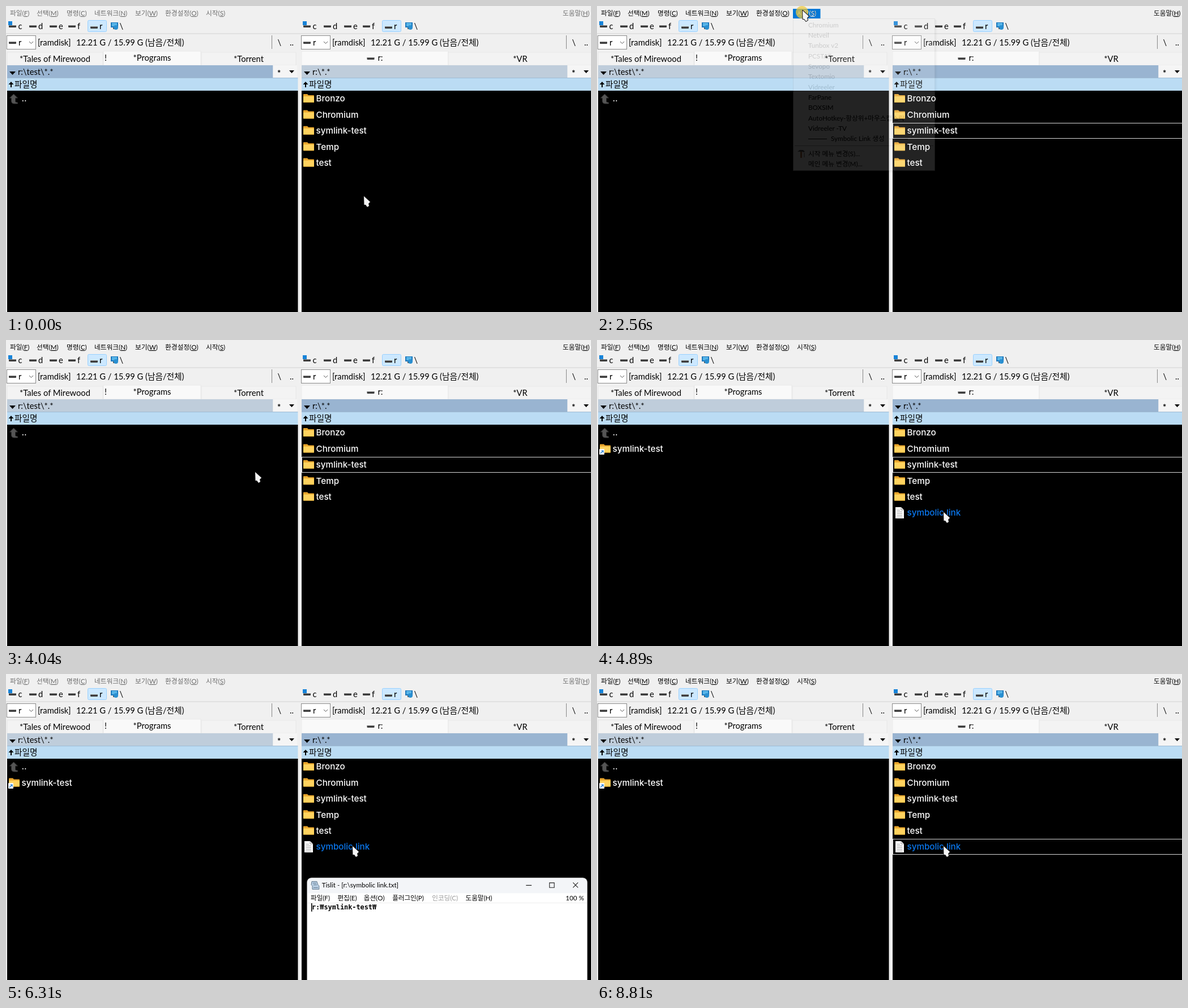
An HTML page that plays this animation: 1033x542 px, repeating every 8910 ms.

```html
<!DOCTYPE html>
<html lang="ko">
<head>
<meta charset="utf-8">
<title>Symbolic link demo</title>
<style>
html, body { margin: 0; width: 100%; height: 100%; overflow: hidden; background: #f0f0f0; }
svg { display: block; width: 1033px; height: 542px; }
text { font-family: Lato, "Noto Sans CJK KR", "Noto Sans CJK", sans-serif; font-size: 14.7px; white-space: pre; }
.small text, text.small { font-size: 11.7px; }
.files text { font-family: Inter, sans-serif; font-size: 15.2px; font-weight: 500; fill: #fff; }
text.mono { font-family: "DejaVu Sans Mono", monospace; font-size: 12px; font-weight: bold; }
.u { text-decoration: underline; }
</style>
</head>
<body>
<svg id="stage" viewBox="0 0 1033 542"></svg>
<script>
const LOOP = 8910;
const BLUE = '#0078d7';

const rect = (x, y, w, h, fill, more = '') =>
  `<rect x="${x}" y="${y}" width="${w}" height="${h}" fill="${fill}" ${more}/>`;
const path = (d, more = '') => `<path d="${d}" ${more}/>`;
const text = (x, y, s, more = '') => `<text x="${x}" y="${y}" ${more}>${s}</text>`;
const group = (content, more = '') => `<g ${more}>${content}</g>`;
const accel = s => s.replace(/\((\w)\)/, '(<tspan class="u">$1</tspan>)');
const centered = 'text-anchor="middle"';
const stroke = (color, width = 1) => `fill="none" stroke="${color}" stroke-width="${width}"`;

const driveIcon = (x, y) => rect(x, y, 13, 4, '#3c3c3c', 'rx="1"') + rect(x, y, 13, 1, '#8a8a8a');

const folder = (x, y) =>
  path(`M${x} ${y + 1}q0-1 1-1h6l2 2h9q1 0 1 1v10h-19z`, 'fill="#e9a52c"') +
  rect(x, y + 4, 19, 11, '#ffd35f', 'rx="1"') + rect(x, y + 14, 19, 1, '#efb63d');

const page = (x, y) =>
  path(`M${x} ${y}h10l5 5v15h-15z`, 'fill="#fafafa"') +
  path(`M${x + 10} ${y}v5h5`, stroke('#999')) +
  path(`M${x + 3} ${y + 5.5}h5m-5 3h9m-9 3h9m-9 3h9m-9 3h9`, stroke('#a8a8a8'));

function driveButtons() {
  const letters = [['c', 21.5], ['d', 57], ['e', 93], ['f', 126], ['r', 165]];
  return rect(144.5, 25.5, 33, 20, '#cce8ff', 'stroke="#99d1ff" rx="2"') +
    rect(4, 27, 7, 7, '#1683d8') +
    letters.map(([s, x]) => driveIcon(s === 'c' ? 5 : x - 16, s === 'r' ? 36 : 34) + text(x, 41, s)).join('') +
    rect(185, 29, 13, 9, '#1c78bd') + rect(187, 30, 9, 6, '#58b5e8') + rect(189, 38, 5, 3, '#555') +
    `<circle cx="194" cy="38" r="4" fill="#2a8fd0"/>` + text(200.5, 41, '\\');
}

function panel(x, tabs, dir, id) {
  const content = driveButtons() +
    rect(1.5, 52.5, 51, 24, '#fff', 'stroke="#8a8a8a"') + driveIcon(5, 63) + text(22, 70, 'r') +
    path('M41 63l3.5 3.5 3.5-3.5', stroke('#555')) +
    text(56, 70, '[ramdisk]') + text(124, 70, '12.21 G / 15.99 G (남음/전체)') +
    rect(469, 52, 1, 24, '#888') + text(479.5, 70, '\\') + text(501, 70, '..') +
    tabs +
    rect(2, 105, 469.5, 23, '#bfcddb', `id="${id}"`) + rect(471.5, 105, 42.5, 23, '#f5f5f5') +
    path('M6 116h11l-5.5 6zM500 114h9l-4.5 5z') + text(21, 122, dir) +
    text(482, 124, '*', centered + ' font-weight="bold"') +
    rect(2, 128, 514, 22, '#bbdcf4') + rect(2, 127, 514, 1, '#9fbbd3') +
    path('M9 134l-4.5 5h3.5v5h2v-5h3.5z') + text(15, 144, '파일명') +
    rect(2, 150, 514, 392, '#000');
  return group(content, `transform="translate(${x} 0)"`);
}

function tab(x, w, label, active, icon = '') {
  const top = active ? 80 : 82;
  return rect(x, top, w, 105 - top, active ? '#f9f9f9' : '#f3f3f3', 'stroke="#e3e3e3" stroke-width=".7"') +
    text(x + w / 2, active ? 97 : 98.5, label, centered) + icon;
}

const leftTabs = tab(2, 169, '*Tales of Mirewood') + tab(172, 172, '*Programs', true) +
  tab(345, 167, '*Torrent') + text(174, 97, '!');
const rightTabs = tab(2, 259, '', true, driveIcon(117.5, 91) + text(136.5, 97, 'r:')) + tab(261, 254, '*VR');

const menuBar = [[7, '파일(F)'], [54, '선택(M)'], [107, '명령(C)'], [156, '네트워크(N)'], [228, '보기(W)'],
  [281, '환경설정(O)'], [353, '시작(S)'], [983, '도움말(H)']]
  .map(([x, s]) => text(x, 17, accel(s))).join('');

// Start menu
const items = ['Chromium', 'Netveil', 'Tunbox v2', 'PCSTAT', 'Sevopo', 'Textomio', 'Vidreeler', 'FarPane',
  'BOXSIM', 'AutoHotkey-항상위+마우스캡스락', 'Vidreeler -TV', 'Symbolic Link 생성'];
const ROW = 18.3;
const rowTop = i => 24.8 + i * ROW;
const menuItems = items.map((s, i) => {
  const last = i === items.length - 1;
  const rules = last ? path('M373 235.5h33M516 235.5h33', 'stroke="currentColor"') : '';
  return group(rules + text(last ? 413 : 373, rowTop(i) + 13, s, 'fill="currentColor"'), 'class="item"');
}).join('');
const startMenu = group(
  rect(349, 25, 252, 271, '#000', 'opacity=".12" rx="2"') + rect(348, 24, 251, 270, '#000', 'opacity=".18"') +
  rect(346.5, 22.5, 250, 269, '#f0f0f0', 'stroke="#8c8c8c"') +
  rect(349, 0, 245, 18, BLUE, 'id="hover"') + menuItems +
  rect(349, 247, 245, 1, '#a0a0a0') +
  path('M354 258l4-3h6l3 3-2 1-3-1h-6z', 'fill="#555"') + rect(359, 258, 3, 11, '#a5673f') +
  path('M366 260v8', stroke('#888', 1.5)) +
  text(373, 265.5, '시작 메뉴 변경(S)...') + text(373, 284, '메인 메뉴 변경(M)...'),
  'id="menu" class="small"');

const names = ['Bronzo', 'Chromium', 'symlink-test', 'Temp', 'test'];
const files = group(
  path('M13.5 156l7 7h-4v6q0 2 4 2v2h-6q-5 0-5-5v-5h-3z', 'fill="#555" stroke="#333"') + text(27.5, 169.3, '..') +
  names.map((s, i) => folder(525, 156 + i * 28.4) + text(547.5, 169.3 + i * 28.4, s)).join('') +
  group(folder(5, 184.5) + rect(4, 193, 9, 10, '#fff', 'rx="1"') +
    path('M6 201l5-5m-3.5 0h3.5v3.5', stroke('#1976d2', 1.2)) + text(27.5, 197.7, 'symlink-test'), 'id="newLink"') +
  group(page(527, 296) + text(547.5, 311.3, 'symbolic link', 'style="fill:#0a78f0"'), 'id="newFile"'),
  'class="files"');

// Text viewer window
const viewerMenu = [[535, '파일(F)'], [583, '편집(E)'], [630, '옵션(O)'], [681, '플러그인(P)'],
  [752, '인코딩(C)'], [812, '도움말(H)'], [991, '100 %']]
  .map(([x, s]) => text(x, 393, s, x === 752 ? 'fill="#999"' : '')).join('');
const viewer = group(
  rect(528.5, 352.5, 501, 220, '#fff', 'rx="8" stroke="#8a8a8a" stroke-width=".8"') +
  path('M529 380v-19q0-8 8-8h484q8 0 8 8v19z', 'fill="#f3f5f8"') +
  path('M537 359h9l2 6 2 2v6h-12v-6l-2-2z', 'fill="#b9cfe4" stroke="#5d7388"') +
  path('M539 362h6m-5 3h6m-6 5h8', stroke('#5d7388')) +
  text(555, 370, 'Tislit - [r:\\symbolic link.txt]') +
  path('M920 366h10M962 361.5h8.5v8.5h-8.5zM1004 361l9 9m0-9l-9 9', stroke('#222', 1.1)) +
  viewerMenu + rect(529, 397, 500, 1, '#eee') +
  text(537, 409, 'r:₩symlink-test₩', 'class="mono" style="font-size:12px"') +
  rect(536, 398, 1.6, 15, '#000', 'id="caret"'),
  'id="viewer" class="small"');

document.getElementById('stage').innerHTML =
  rect(0, 0, 1033, 542, '#f0f0f0') + rect(0, 48.5, 1033, 1, '#d4d4d4') +
  rect(346, 5, 48.5, 17, BLUE, 'id="startHot"') +
  group(menuBar, 'id="menuBar" class="small"') +
  panel(0, leftTabs, 'r:\\test\\*.*', 'leftPath') + panel(520, rightTabs, 'r:\\*.*', 'rightPath') +
  rect(515.5, 80, 6.5, 462, '#f0f0f0') + files +
  rect(522.5, 0, 520, 27, 'none', 'id="focus" stroke="#d8d8d8"') +
  text(353, 17, accel('시작(S)'), 'id="startLabel" class="small" fill="#fff"') +
  startMenu + viewer +
  group(`<circle id="click" cx="-1" cy="3" r="11" fill="#f0c93a" opacity=".72"/>` +
    path('M0 0L11 10 8 13 9 17 6 19 3 15H.5Z',
      'fill="#f4f4f4" stroke="#111" stroke-width="2" stroke-linejoin="round" paint-order="stroke"'), 'id="cursor"');

const el = Object.fromEntries([...document.querySelectorAll('[id]')].map(e => [e.id, e]));
const itemEls = [...document.querySelectorAll('.item')];
const show = (e, on) => { e.style.display = on ? '' : 'none'; };
const clamp = v => Math.min(1, Math.max(0, v));
const progress = (t, from, to) => clamp((t - from) / (to - from));
const within = (t, from, to) => t >= from && t < to;

// Pointer legs: start, end, then from, control and to points
const legs = [
  [610, 1230, [632, 337], [546, 290], [602, 221]],
  [1830, 2300, [602, 221], [500, 90], [363, 8]],
  [2870, 3490, [363, 8], [462, 182], [440, 234]],
  [4500, 4890, [440, 234], [530, 250], [612, 305]],
];
const clicks = [[1430, 1570], [2560, 2690], [3940, 4040], [5190, 5260]];

function pointer(t) {
  const [from, to, a, c, b] = legs.filter(l => t >= l[0]).pop() || legs[0];
  const p = progress(t, from, to);
  const u = p * p * (3 - 2 * p);
  return [0, 1].map(k => (1 - u) ** 2 * a[k] + 2 * u * (1 - u) * c[k] + u * u * b[k]);
}

function draw(t) {
  const [x, y] = pointer(t);
  el.cursor.setAttribute('transform', `translate(${x.toFixed(1)} ${y.toFixed(1)})`);
  show(el.click, clicks.some(([a, b]) => within(t, a, b)));

  const picked = t >= 1430;
  const active = within(t, 1430, 5940) || t >= 8620;
  el.menuBar.setAttribute('fill', active ? '#000' : '#6d6d6d');
  el.leftPath.setAttribute('fill', picked ? '#bfcddb' : '#99b4d1');
  el.rightPath.setAttribute('fill', picked ? '#99b4d1' : '#bfcddb');
  show(el.focus, active);
  el.focus.setAttribute('y', t < 5190 ? 207.5 : 292.5);

  const hot = within(t, 1830, 4010) && (t >= 2560 || (x < 395 && y < 22));
  show(el.startHot, hot);
  show(el.startLabel, hot);

  show(el.menu, within(t, 2560, 4010));
  el.menu.setAttribute('opacity', 0.14 + 0.86 * progress(t, 2560, 2710));
  const row = Math.min(items.length - 1, Math.floor((y - rowTop(0)) / ROW));
  show(el.hover, row >= 0);
  el.hover.setAttribute('y', Math.round(rowTop(row)));
  itemEls.forEach((e, i) => { e.style.color = i === row ? '#fff' : '#000'; });

  show(el.newLink, t >= 4200);
  show(el.newFile, t >= 4300);

  const opening = (1 - progress(t, 6180, 6500)) ** 3;
  const closing = progress(t, 8590, 8790);
  const scale = 1 - 0.06 * opening - 0.06 * closing;
  show(el.viewer, within(t, 6180, 8810));
  el.viewer.setAttribute('opacity', progress(t, 6160, 6280) * (1 - closing));
  el.viewer.setAttribute('transform', `translate(779 1040) scale(${scale.toFixed(4)}) translate(-779 -1040)`);
  show(el.caret, t < 6480 || within(t, 7010, 7550) || within(t, 8080, 8590));
}

const started = performance.now();
function frame() {
  draw((performance.now() - started) % LOOP);
  requestAnimationFrame(frame);
}
frame();
</script>
</body>
</html>
```
